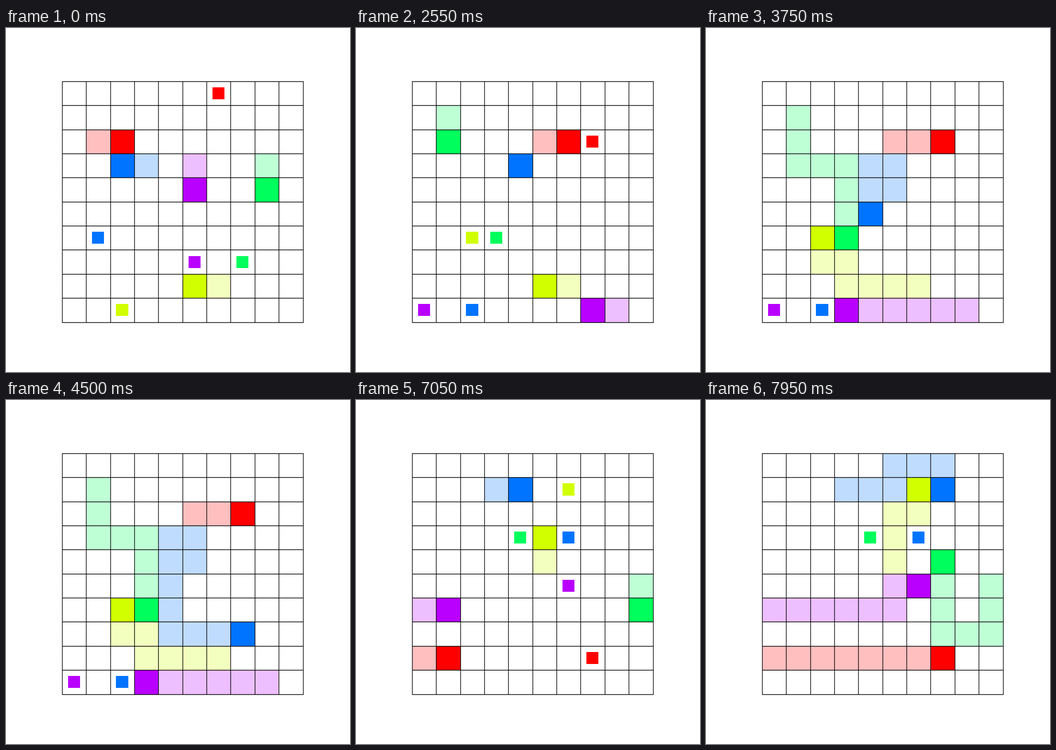
An HTML page that plays this animation: 748x748 px, repeating every 8000 ms.

```html
<!DOCTYPE html>
<html lang="en">
<head>
<meta charset="utf-8">
<title>Grid routing</title>
<style>
html, body { margin: 0; width: 100%; height: 100%; overflow: hidden; background: #fff; }
svg { display: block; width: 100vw; height: 100vh; }
</style>
</head>
<body>
<svg viewBox="0 0 748 748">
  <rect width="748" height="748" fill="#fff"/>
  <g id="cells"></g>
  <path id="grid" fill="none" stroke="#000" stroke-width="1.39" stroke-linecap="square"/>
</svg>
<script>
const LOOP = 8000, TICK = 150, N = 10, CELL = 52.36;
const snap = v => Math.round(v) + 0.5;
const lineX = c => snap(121.95 + c * CELL);
const lineY = r => snap(115.94 + r * CELL);

// [solid, trail]
const COLORS = {
  red: ['#ff0000', '#ffbfbf'],
  lime: ['#d1ff00', '#f3ffbf'],
  green: ['#00ff5c', '#bfffd6'],
  blue: ['#0074ff', '#bfdcff'],
  purple: ['#b900ff', '#edbfff']
};
const MOVES = { R: [1, 0], L: [-1, 0], U: [0, -1], D: [0, 1], '.': [0, 0] };

// Each agent: colour, start cell, goal cell, moves ('.' waits)
const ROUNDS = [
  { from: 0, agents: [
    ['red', [1, 2], [6, 0], 'RRRURRU'],
    ['lime', [6, 8], [2, 9], 'LLLLD'],
    ['green', [8, 3], [7, 7], 'DDDLD'],
    ['blue', [3, 3], [1, 6], 'LDDDL'],
    ['purple', [5, 3], [5, 7], 'DDDD']
  ] },
  { from: 2550, agents: [
    ['red', [5, 2], [7, 2], 'RR'],
    ['lime', [6, 8], [2, 6], 'LLLULU'],
    ['green', [1, 1], [3, 6], 'DDRRDDD'],
    ['blue', [4, 3], [2, 9], '.....RDLDDDRRRDRURDD'],
    ['purple', [8, 9], [0, 9], 'LLLLL']
  ] },
  { from: 7050, agents: [
    ['red', [0, 8], [7, 8], 'RRRRRRR'],
    ['lime', [5, 4], [6, 1], 'UURU'],
    ['green', [9, 5], [4, 3], 'DDLLUUU'],
    ['blue', [3, 1], [6, 3], 'RR.URRD'],
    ['purple', [0, 6], [6, 5], 'RRRRRUR']
  ] }
];

const rect = (x0, y0, x1, y1, fill) =>
  `<rect x="${x0}" y="${y0}" width="${x1 - x0}" height="${y1 - y0}" fill="${fill}"/>`;

const cell = ([c, r], fill) =>
  rect(lineX(c), lineY(r), lineX(c + 1), lineY(r + 1), fill);

function goal([c, r], fill) {
  const x = 121.65 + (c + 0.25) * CELL, y = 115.94 + (r + 0.25) * CELL;
  const [x0, y0, x1, y1] = [x, y, x + CELL / 2, y + CELL / 2].map(Math.round);
  return rect(x0, y0, x1, y1, fill);
}

function walk(start, moves, steps) {
  const path = [start];
  for (const m of moves.slice(0, steps)) {
    const [c, r] = path[path.length - 1], [dc, dr] = MOVES[m];
    path.push([c + dc, r + dr]);
  }
  return path;
}

let gridPath = '';
for (let i = 0; i <= N; i++) {
  gridPath += `M${lineX(i)} ${lineY(0)}V${lineY(N)}M${lineX(0)} ${lineY(i)}H${lineX(N)}`;
}
document.getElementById('grid').setAttribute('d', gridPath);

const cells = document.getElementById('cells');
let shown = '';

function draw(time) {
  const t = time % LOOP;
  const round = ROUNDS.filter(r => r.from <= t).pop();
  const steps = Math.floor((t - round.from) / TICK) + 1;
  const key = round.from + ':' + steps;
  if (key === shown) return;
  shown = key;
  let goals = '', trails = '', heads = '';
  for (const [name, start, end, moves] of round.agents) {
    const [solid, pale] = COLORS[name];
    const path = walk(start, moves, steps);
    goals += goal(end, solid);
    trails += path.map(p => cell(p, pale)).join('');
    heads += cell(path[path.length - 1], solid);
  }
  cells.innerHTML = trails + goals + heads;
}

const begin = performance.now();
function frame() {
  draw(performance.now() - begin);
  requestAnimationFrame(frame);
}
frame();
</script>
</body>
</html>
```
